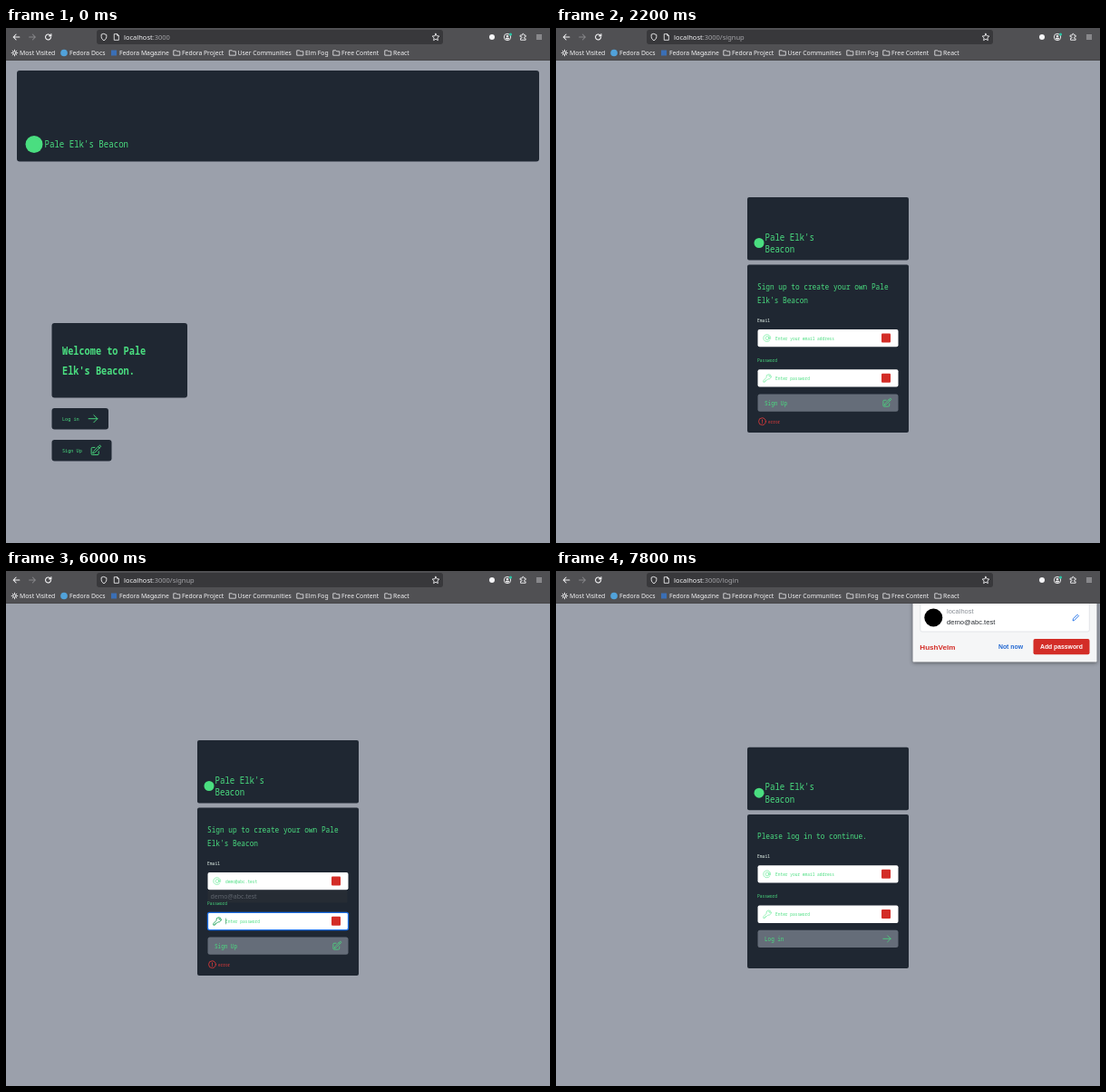
Write an HTML page that moves like this. It is 600x569 px and loops after 8 s.

```html
<!DOCTYPE html>
<html lang="en">
<head>
<meta charset="utf-8">
<title>Sign up walkthrough</title>
<style>
  html, body { margin: 0; width: 100%; height: 100%; overflow: hidden; background: #9ba0ab; }
  svg { display: block; width: 600px; height: 569px; }
  text { white-space: pre; }
  .ui { font-family: "Noto Sans", sans-serif; }
  .arial { font-family: "Liberation Sans", Arial, sans-serif; }
  .mono { font-family: "Noto Sans Mono", monospace; }
</style>
</head>
<body>
<svg id="stage" viewBox="0 0 600 569"></svg>
<script>
const LOOP = 8000;
const GREEN = '#4ade80', PALE = '#86efac', DARK = '#1f2732', RED = '#d32d27', BLUE = '#1c6fe8', LIGHT = '#f4f4f6';
const EMAIL = 'demo@abc.test';

const ICONS = {
  arrow: 'M13.5 4.5 21 12l-7.5 7.5M3 12h18',
  pencil: 'm16.9 4.5 1.7-1.7a1.9 1.9 0 1 1 2.6 2.6L10.6 16a4.5 4.5 0 0 1-1.9 1.1L6 18l.8-2.7a4.5 4.5 0 0 1 1.1-1.9zm0 0 2.6 2.6M18 14v4.75A2.25 2.25 0 0 1 15.75 21H5.25A2.25 2.25 0 0 1 3 18.75V8.25A2.25 2.25 0 0 1 5.25 6H10',
  at: 'M16.5 12a4.5 4.5 0 1 1-9 0 4.5 4.5 0 0 1 9 0zm0 0c0 1.7.6 3 1.9 3s1.9-1.3 1.9-3a9 9 0 1 0-2.6 6.4M16.5 12V8.25',
  key: 'M15.75 5.25a3 3 0 0 1 3 3m3 0a6 6 0 0 1-7 5.9c-.6-.1-1.2 0-1.6.4L10.5 17.25H8.25v2.25H6v2.25H2.25v-2.8c0-.6.2-1.2.7-1.6l6.5-6.5c.4-.4.5-1 .4-1.6a6 6 0 1 1 11.9-1.7z',
  alert: 'M12 8v5M21 12a9 9 0 1 1-18 0 9 9 0 0 1 18 0zM12 16v.5',
  back: 'M11 4 3 12l8 8M3 12h18',
  forward: 'M13 4l8 8-8 8M21 12H3',
  reload: 'M20 13a8 8 0 1 1-2.5-7l3 3M21 3v6h-6',
  shield: 'M12 2l8 3v6c0 6-4 9.500-8 11.500-4-2-8-5.500-8-11.500V5z',
  page: 'M5 2h9l5 5v15H5zM14 2v5h5',
  star: 'M12 2.500l2.900 6.300 6.800.8-5 4.700 1.300 6.800-6-3.400-6 3.400 1.300-6.800-5-4.700 6.800-.8z',
  puzzle: 'M4 8h5V6a2.500 2.500 0 0 1 5 0v2h5v5h-2a2.500 2.500 0 0 0 0 5h2v4H4v-5h2a2.200 2.200 0 0 0 0-4.500H4z',
  menu: 'M3 5h18M3 12h18M3 19h18',
  folder: 'M2 4h8l3 3h9v13H2z',
  gear: 'M12 2v4M12 18v4M2 12h4M18 12h4M5 5l3 3M16 16l3 3M19 5l-3 3M8 16l-3 3M17 12a5 5 0 1 1-10 0 5 5 0 0 1 10 0z',
  pen: 'M3 21l1-5L16 4l4 4L8 20z'
};

const rect = (x, y, w, h, fill, r = 0, extra = '') =>
  `<rect x="${x}" y="${y}" width="${w}" height="${h}" rx="${r}" fill="${fill}" ${extra}/>`;
const circle = (x, y, r, fill, extra = '') => `<circle cx="${x}" cy="${y}" r="${r}" fill="${fill}" ${extra}/>`;
const label = (x, y, text, size, fill = LIGHT, font = 'ui', extra = '') =>
  `<text class="${font}" x="${x}" y="${y}" font-size="${size}" fill="${fill}" ${extra}>${text}</text>`;
// Tall, narrow terminal lettering, sized by the advance of one character
const mono = (x, y, text, advance, fill = GREEN, extra = '') =>
  `<text class="mono" transform="translate(${x} ${y}) scale(1 1.18)" font-size="${advance / 0.6}" fill="${fill}" ${extra}>${text}</text>`;
const icon = (name, cx, cy, size, color = GREEN, width = 1.7, fill = 'none') =>
  `<path transform="translate(${cx - size / 2} ${cy - size / 2}) scale(${size / 24})" d="${ICONS[name]}" fill="${fill}" stroke="${color}" stroke-width="${width}" stroke-linecap="round" stroke-linejoin="round"/>`;
const shift = (dy, content) => `<g transform="translate(0 ${dy})">${content}</g>`;

// Value of the last [time, value] step reached
const stepAt = (t, steps) => steps.reduce((value, [start, next]) => t >= start ? next : value, 0);

function browser(path) {
  const folders = [[188.5, 'Fedora Project'], [250, 'User Communities'], [324.500, 'Elm Fog'], [364.500, 'Free Content'], [421.500, 'React']];
  return rect(0, 0, 600, 36, '#505053') + rect(0, 35, 600, 1, '#47474a')
    + rect(100, 2, 382, 16, '#38383b', 3)
    + icon('back', 11.5, 10, 9, LIGHT, 2.8) + icon('forward', 29, 10, 9, '#88888b', 2.8) + icon('reload', 46.5, 10, 9, LIGHT, 2.8)
    + icon('shield', 108, 10, 8.5, LIGHT, 2.5) + icon('page', 122, 10, 8, LIGHT, 2.5)
    + label(130, 13, `localhost<tspan fill="#a5a5a9">:3000${path}</tspan>`, 7.5)
    + icon('star', 474, 10, 9.5, LIGHT, 2.2)
    + circle(536, 10, 3, LIGHT)
    + circle(553, 10, 3.700, 'none', `stroke="${LIGHT}" stroke-width=".9"`) + circle(553, 9, 1.300, LIGHT)
    + rect(551, 10.700, 4, 1.800, LIGHT, 0.900) + circle(556.500, 7, 1.600, '#2ac3a2')
    + icon('puzzle', 570.5, 9.5, 9, LIGHT, 2.4) + icon('menu', 588, 10, 7, LIGHT, 2.4)
    + icon('gear', 9.5, 27.5, 8, LIGHT, 2.600) + label(15, 30, 'Most Visited', 6.85)
    + circle(64, 27.5, 3.800, '#51a2da') + label(70, 30, 'Fedora Docs', 6.8)
    + rect(116, 24.500, 6, 6, '#3b6fb6') + label(125, 30, 'Fedora Magazine', 6.8)
    + folders.map(([x, name]) => icon('folder', x, 27.5, 8, LIGHT, 2.3) + label(x + 5.6, 30, name, 6.8)).join('');
}

function homePage(t) {
  const hover = stepAt(t, [[0, DARK], [1000, '#2b3542'], [1200, '#374151'], [1800, DARK]]);
  return rect(12, 47, 576, 100.5, DARK, 3)
    + circle(31, 128.5, 9.5, GREEN) + mono(42.5, 132, "Pale Elk's Beacon", 5.45)
    + rect(50.5, 326, 149.5, 82.5, DARK, 3)
    + mono(62, 361, 'Welcome to Pale', 6.15, GREEN, 'font-weight="700"')
    + mono(62, 383, "Elk's Beacon.", 6.15, GREEN, 'font-weight="700"')
    + rect(50.5, 420, 62.5, 23.500, DARK, 3) + mono(62, 434, 'Log in', 3.12) + icon('arrow', 96, 431.700, 13)
    + rect(50.5, 455, 66, 23.500, hover, 3) + mono(62, 469, 'Sign Up', 3.12) + icon('pencil', 99, 466.700, 13);
}

function brandCard() {
  return rect(211, 187, 178, 69.5, DARK, 2) + circle(224, 237.5, 5.5, GREEN)
    + mono(230.5, 234.5, "Pale Elk's", 5.45) + mono(230.5, 248, 'Beacon', 5.45);
}

function field(y, iconName, placeholder, { text = '', focus = false, caret = false, hidden = 0 } = {}) {
  const caretX = hidden ? 243.5 + hidden * 4.700 : 242.3 + text.length * 2.72;
  let content = '';
  if (hidden) for (let i = 0; i < hidden; i++) content += circle(244.800 + i * 4.700, y + 10, 1.450, GREEN);
  else content = mono(242, y + 11.500, text || placeholder, 2.72);
  const ring = focus ? `stroke="${BLUE}" stroke-width="1.3"` : '';
  return rect(222.5, y, 155, 19.3, '#fff', 2, ring)
    + icon(iconName, 233, y + 9.6, 10.5, focus ? '#2fa864' : PALE, focus ? 2.2 : 1.9)
    + content
    + (caret ? rect(caretX, y + 6.200, 0.600, 6.800, '#3f8f62') : '')
    + rect(359, y + 4.5, 10, 10, RED, 1);
}

function fields(email, password, action, actionIcon) {
  return mono(222, 324.5, 'Email', 2.8, '#e6f5ec') + field(333, 'at', 'Enter your email address', email)
    + mono(222, 369, 'Password', 2.75) + field(377.3, 'key', 'Enter password', password)
    + rect(222.5, 404.5, 155, 19.2, '#656d79', 2.5)
    + mono(230, 416.700, action, 3.57) + icon(actionIcon, 365, 414, 11);
}

function signupPage(t) {
  const typed = stepAt(t, [[3800, 3], [4000, 4], [5000, 5], [5200, 8], [5600, 11], [5800, 13]]);
  const hidden = stepAt(t, [[6200, 1], [6400, 2], [6600, 3], [6800, 4], [7000, 6], [7200, 8]]);
  const emailFocus = t >= 3000 && t < 6000;
  const email = {
    text: EMAIL.slice(0, typed), focus: emailFocus,
    caret: emailFocus && typed > 0 && !(t >= 4200 && t < 5000)
  };
  const password = { focus: t >= 6000, caret: t >= 6000, hidden };
  const suggestion = t >= 3800 && t < 6200
    ? `<g opacity="${t < 6000 ? 1 : 0.3}">` + rect(222.5, 352.5, 154, 14, '#38393b', 1)
      + label(225.5, 362.3, EMAIL, 7) + '</g>' : '';
  const tooltip = t >= 3600 && t < 3800
    ? rect(261.3, 357, 86, 23, '#090b10', 2) + label(267.3, 371, 'Please fill out this field.', 6.9) : '';
  return brandCard() + rect(211, 261.5, 178, 185.5, DARK, 2)
    + mono(222, 288.5, 'Sign up to create your own Pale', 4.67) + mono(222, 303.5, "Elk's Beacon", 4.67)
    + fields(email, password, 'Sign Up', 'pencil')
    + icon('alert', 227.5, 434.700, 10.5, '#e23b3b', 1.9) + mono(234, 436.7, 'error', 2.65, '#e23b3b')
    + suggestion + tooltip;
}

function loginPage() {
  return shift(7.700, brandCard()) + rect(211, 269, 178, 170, DARK, 2)
    + mono(222, 295.700, 'Please log in to continue.', 4.65)
    + shift(-7.700, fields({}, {}, 'Log in', 'arrow'));
}

const SHADOW = 'style="filter:drop-shadow(0 1px 2px #0007)"';

function passwordPopup() {
  return rect(222.5, 396.500, 156, 74.500, '#f7f8f9', 1, SHADOW)
    + rect(222.5, 433.3, 156, 0.800, '#d3d6da') + rect(222.5, 451.2, 156, 0.800, '#d9dce0')
    + label(232.7, 411.5, 'Password suggestion', 6.2, '#868c94', 'arial')
    + label(232.7, 422.3, 'd^Q7kVL@DtBbJOvw', 7.2, '#1d2025', 'mono')
    + rect(337, 410, 7, 7, BLUE, 1) + rect(340.5, 413.500, 7, 7, BLUE, 1, 'stroke="#f7f8f9" stroke-width=".6"')
    + circle(360, 415.3, 4.5, 'none', `stroke="${BLUE}" stroke-width="1.4" stroke-dasharray="7.600 1.825"`)
    + label(232.7, 444.7, 'Customize...', 6.2, '#24272c', 'arial')
    + label(232.7, 463.2, 'View saved logins for this site', 6.2, '#24272c', 'arial');
}

function savePopup() {
  const bold = 'font-weight="700"';
  return rect(393.5, 20, 203, 80.5, '#f5f6f7', 1, SHADOW)
    + rect(401.8, 20, 186.500, 47, '#fff', 2, 'stroke="#dcdfe3" stroke-width=".8"')
    + circle(416.3, 51.5, 10, '#000')
    + label(431, 47, 'localhost', 7.5, '#8b9097', 'arial') + label(431, 59, EMAIL, 7.6, '#2a2e34', 'arial')
    + icon('pen', 573.5, 51.2, 9, BLUE, 2.400)
    + label(401.3, 87.2, 'HushVelm', 8.1, RED, 'arial', bold)
    + label(488, 86, 'Not now', 6.85, '#1f66d1', 'arial', bold)
    + rect(526.5, 75, 62, 17.3, RED, 2) + label(534, 86, 'Add password', 6.8, '#fff', 'arial', bold);
}

function scene(t) {
  const [page, path] = t < 2200 ? [homePage(t), ''] : t < 7600 ? [signupPage(t), '/signup'] : [loginPage(), '/login'];
  return rect(0, 0, 600, 569, '#9ba0ab') + page
    + (t >= 6400 && t < 7800 ? passwordPopup() : '')
    + (t >= 7800 ? savePopup() : '')
    + browser(path);
}

const stage = document.getElementById('stage');
let shown = '';
function tick() {
  const markup = scene(performance.now() % LOOP);
  if (markup !== shown) stage.innerHTML = shown = markup;
  requestAnimationFrame(tick);
}
tick();
</script>
</body>
</html>
```
